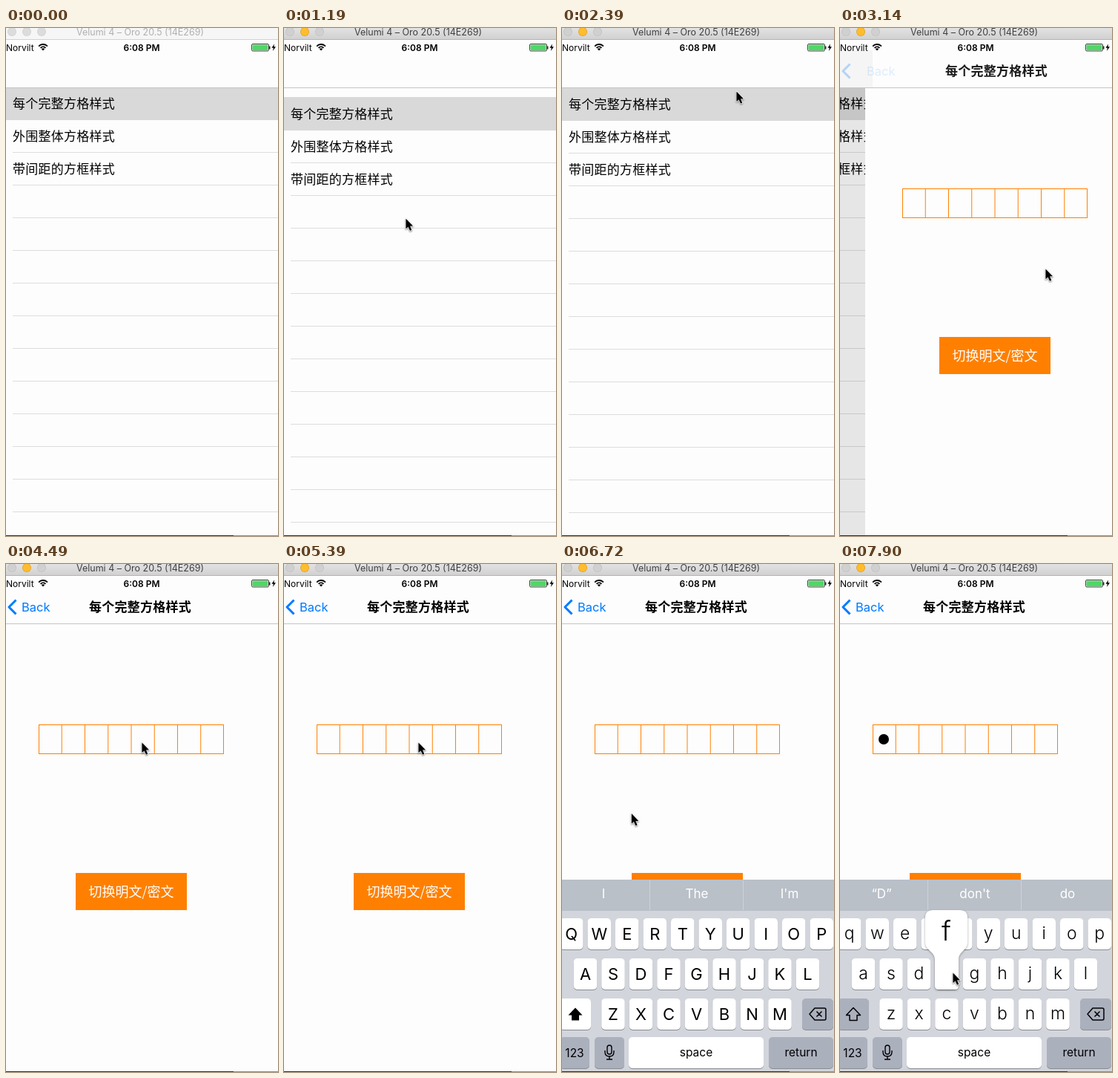
Animation, 367 px wide and 684 px high, one loop 8000 ms. Source, as an HTML page with a canvas:

```html
<!DOCTYPE html>
<html lang="zh-CN">
<head>
<meta charset="utf-8">
<style>
html, body { margin: 0; width: 100%; height: 100%; overflow: hidden; background: #fff; }
canvas { display: block; }
</style>
</head>
<body>
<canvas id="stage" width="367" height="684"></canvas>
<script>
const ctx = document.getElementById('stage').getContext('2d');
const LATIN = 'Inter, "Noto Sans", sans-serif';
const CJK = '"Noto Sans CJK SC", "Noto Sans CJK", sans-serif';
const ORANGE = '#ff8000', BLUE = '#007aff', KEY_GRAY = '#abb0bd';
const LOOP = 8000, PAPER = '#fdfdfd';

// Pointer tip: time, x, y
const POINTER = [
  [140, 255, 647], [290, 185, 400], [440, 146, 319], [740, 146, 319],
  [1040, 164, 229], [1640, 164, 338], [1790, 165, 346], [2390, 235, 85],
  [2690, 262, 92], [2840, 262, 92], [3140, 277, 324], [3890, 143, 285],
  [4340, 186, 250], [4490, 183, 240], [5240, 183, 240], [5390, 181, 240],
  [5840, 181, 239], [6430, 65, 232], [7320, 152, 550]
];

function snap(t) {
  const floorTo = (start, step) => start + step * Math.floor((t - start) / step);
  if (t < 140) return 0;
  if (t < 6430) return floorTo(140, 150);
  if (t < 6570) return 6430;
  if (t < 7610) return floorTo(6570, 150);
  return Math.min(7900, floorTo(7610, 145));
}

function pointerAt(t) {
  const next = POINTER.findIndex(p => p[0] > t);
  if (next < 0) return POINTER[POINTER.length - 1].slice(1);
  const [t0, x0, y0] = POINTER[next - 1], [t1, x1, y1] = POINTER[next];
  const k = (t - t0) / (t1 - t0);
  return [x0 + (x1 - x0) * k, y0 + (y1 - y0) * k];
}

function rect(x, y, w, h, color) {
  ctx.fillStyle = color;
  ctx.fillRect(x, y, w, h);
}

function disc(x, y, r, color) {
  ctx.fillStyle = color;
  ctx.beginPath();
  ctx.arc(x, y, r, 0, 7);
  ctx.fill();
}

function text(str, x, y, size, { color = '#000', align = 'center', weight = 400, font = LATIN, spacing = 0 } = {}) {
  ctx.font = `${weight} ${size}px ${font}`;
  ctx.letterSpacing = spacing + 'px';
  ctx.textAlign = align;
  ctx.textBaseline = 'alphabetic';
  ctx.fillStyle = color;
  ctx.fillText(str, x, y);
}

function path(d, x, y, { fill, stroke, width = 1 }) {
  const shape = new Path2D(d);
  ctx.save();
  ctx.translate(x, y);
  ctx.lineJoin = 'round';
  if (stroke) { ctx.strokeStyle = stroke; ctx.lineWidth = width; ctx.stroke(shape); }
  if (fill) { ctx.fillStyle = fill; ctx.fill(shape); }
  ctx.restore();
}

function withAlpha(alpha, draw) {
  ctx.save();
  ctx.globalAlpha = Math.max(0, Math.min(1, alpha));
  draw();
  ctx.restore();
}

function titleBar(active) {
  const shade = ctx.createLinearGradient(0, 0, 0, 15);
  shade.addColorStop(0, active ? '#e2e2e2' : '#f6f6f6');
  shade.addColorStop(1, active ? '#d1d1d1' : '#f6f6f6');
  rect(0, 0, 367, 15, shade);
  rect(0, 15, 367, 1, active ? '#b4b4b4' : '#d2d2d2');
  [8, 28, 48].forEach((x, i) => {
    const lit = active && i === 1;
    disc(x, 5, 6, lit ? '#dfa023' : active ? '#bfbfbf' : '#d0d0d0');
    disc(x, 5, 5.3, lit ? '#ffbd2e' : active ? '#d0d0d0' : '#dcdcdc');
  });
  text('Velumi 4 – Oro 20.5 (14E269)', 181, 10, 12.5, { color: active ? '#404040' : '#b0b0b0' });
}

function statusBar() {
  text('Norvilt', 0, 31, 12, { align: 'left' });
  ctx.strokeStyle = '#000';
  ctx.lineWidth = 1.8;
  for (const r of [4.6, 8]) {
    ctx.beginPath();
    ctx.arc(50, 30, r, -Math.PI * 0.76, -Math.PI * 0.24);
    ctx.stroke();
  }
  path('M0 0L-2.3 -2.4Q0 -4 2.3 -2.4Z', 50, 30.5, { fill: '#000' });
  text('6:08 PM', 183, 31, 12, { weight: 600 });
  path('M1.5 0H21.5Q23 0 23 1.5V8Q23 9.5 21.5 9.5H1.5Q0 9.5 0 8V1.5Q0 0 1.5 0Z', 331.5, 21.5, { stroke: '#444', width: 1 });
  rect(332.5, 22.5, 21, 7.5, '#4cd964');
  rect(355, 24.5, 1.5, 4, '#333');
  path('M3.5 0L0 5.2H2.4L1.4 9.5L5.5 3.8H3Z', 358.5, 21.5, { fill: '#000' });
}

function list(offset, shift, dim) {
  ctx.save();
  ctx.translate(-shift, offset);
  rect(0, 79, 375, 45, '#d9d9d9');
  ['每个完整方格样式', '外围整体方格样式', '带间距的方框样式'].forEach((label, i) =>
    text(label, 9, 108 + 44 * i, 17, { align: 'left', font: CJK, spacing: 0.25 }));
  for (let y = 167; y < 684; y += 44) rect(9, y, 480, 1, '#dddde0');
  ctx.restore();
  if (dim > 0) rect(0, 80, 367, 604, `rgba(0,0,0,${dim})`);
}

function detail(x, dotted) {
  ctx.save();
  ctx.translate(x, 0);
  rect(-6, 80, 375, 604, PAPER);
  rect(44, 216, 250, 1, ORANGE);
  rect(44, 255, 250, 1, ORANGE);
  rect(44, 216, 1, 40, ORANGE);
  rect(293, 216, 1, 40, ORANGE);
  for (let i = 1; i < 8; i++) rect(43.5 + 31.25 * i, 216, 1, 40, ORANGE);
  if (dotted) disc(59, 236, 7, '#000');
  rect(94, 416, 150, 50, ORANGE);
  text('切换明文/密文', 169, 448, 18, { color: '#fff', font: CJK });
  ctx.restore();
}

function navBar(pushed, distance) {
  rect(0, 16, 367, 64, PAPER);
  if (pushed) {
    if (distance > 0.5) rect(0, 30, distance + 4, 50, '#f5f5f5');
    withAlpha(1 - distance / 55, () => path('M11 1L1.5 10.5L11 20', 2.5, 47.5, { stroke: BLUE, width: 3 }));
    withAlpha(1 - distance / 46, () =>
      text('Back', 21 + distance * 0.375, 64, 16.5, { color: BLUE, align: 'left' }));
    withAlpha(1 - distance / 375, () =>
      text('每个完整方格样式', 181 + distance * 0.75, 64, 17, { weight: 600, font: CJK, spacing: 0.25 }));
  }
  rect(0, 80, 367, 1, '#c4c4c6');
}

function key(x, y, w, color = '#fff') {
  ctx.fillStyle = '#898c91';
  ctx.beginPath();
  ctx.roundRect(x, y + 1, w, 42, 5);
  ctx.fill();
  ctx.fillStyle = color;
  ctx.beginPath();
  ctx.roundRect(x, y, w, 42, 5);
  ctx.fill();
}

function keyboard(top, lower, words, popup) {
  ctx.save();
  ctx.translate(0, top);
  rect(0, 0, 367, 260, '#d2d5db');
  rect(0, 0, 367, 42, '#bac0c8');
  rect(118, 1, 1, 40, '#d0d2d4');
  rect(244, 1, 1, 40, '#d0d2d4');
  words.forEach((word, i) => text(word, [56, 182, 307][i], 25, 17, { color: '#fff' }));

  [['QWERTYUIOP', -3], ['ASDFGHJKL', 15.75], ['ZXCVBNM', 53.25]].forEach(([letters, left], row) => {
    [...letters].forEach((letter, i) => {
      const x = left + 37.5 * i, y = 52 + 54 * row;
      key(x, y, 31.5);
      text(lower ? letter.toLowerCase() : letter, x + 15.75, y + (lower ? 27.5 : 29), lower ? 23 : 22,
        { weight: lower ? 300 : 400 });
    });
  });

  key(-3, 160, 42, lower ? KEY_GRAY : '#fff');
  const arrow = 'M0 -9L9.5 1H5V8H-5V1H-9.5Z';
  path(arrow, 18, 181.5, lower ? { stroke: '#000', width: 1.5 } : { fill: '#000' });
  key(324, 160, 42, KEY_GRAY);
  path('M-11 0L-4 -8H9Q11 -8 11 -6V6Q11 8 9 8H-4ZM-1.5 -3.5L5.5 3.5M5.5 -3.5L-1.5 3.5', 345, 181, { stroke: '#000', width: 1.5 });

  key(-3, 212, 40, KEY_GRAY);
  key(44, 212, 40, KEY_GRAY);
  key(90, 212, 182);
  key(279, 212, 87, KEY_GRAY);
  text('123', 17, 239, 15.5);
  text('space', 181, 238, 15.5);
  text('return', 322.5, 238, 15.5);
  path('M-3 -6Q-3 -9 0 -9T3 -6V0Q3 3 0 3T-3 0ZM-6 -2V0Q-6 6 0 6T6 0V-2M0 6V10M-4 10H4', 64, 232, { stroke: '#000', width: 1.4 });

  if (popup) {
    ctx.save();
    ctx.shadowColor = 'rgba(0,0,0,.35)';
    ctx.shadowBlur = 3;
    ctx.shadowOffsetY = 1;
    path('M125 41H162Q172 41 172 51V84C172 96 160 96 160 108V143Q160 148 155 148H133Q128 148 128 143V108C128 96 115 96 115 84V51Q115 41 125 41Z',
      0, 0, { fill: '#fff' });
    ctx.restore();
    text('f', 143.5, 82, 37, { weight: 300 });
  }
  ctx.restore();
}

function pointer(x, y) {
  ctx.save();
  ctx.shadowColor = 'rgba(0,0,0,.35)';
  ctx.shadowBlur = 2;
  ctx.shadowOffsetY = 1;
  path('M.5 .5V14L3.6 11.2L6 16.6L8.2 15.7L5.9 10.3H10Z', x, y, { fill: '#000', stroke: '#fff', width: 2 });
  ctx.restore();
}

function draw(t) {
  const pushed = t >= 2990, typed = t >= 7610;
  const tip = t >= 140 ? pointerAt(t) : null;
  rect(0, 0, 367, 684, PAPER);

  // Pull down with resistance, then spring back.
  let offset = 0;
  if (t >= 1040 && t <= 1790) offset = (tip[1] - 229) * 0.513;
  else if (t > 1790) offset = 60 * Math.exp((1790 - t) / 146);

  const distance = pushed ? Math.round(40 * Math.exp((3140 - t) / 90)) : 375;
  const progress = 1 - distance / 375;
  if (distance > 0) list(Math.round(offset), 110 * progress, 0.1 * progress);
  if (pushed) detail(distance, typed);
  navBar(pushed, distance);
  titleBar(t >= 1040);
  statusBar();

  if (t >= 5390) {
    const drop = Math.min(260, Math.round(4 * Math.exp((5690 - t) / 55)));
    const words = t >= 7755 ? ['“D”', "don't", 'do'] : ['I', 'The', "I'm"];
    keyboard(425 + drop, typed, words, t >= 7900);
  }
  rect(0, 683, 307, 1, '#2c2c30');
  rect(307, 683, 60, 1, '#8e8e90');
  if (tip) pointer(...tip);
}

function frame() {
  draw(snap(performance.now() % LOOP));
  requestAnimationFrame(frame);
}
frame();
</script>
</body>
</html>
```
